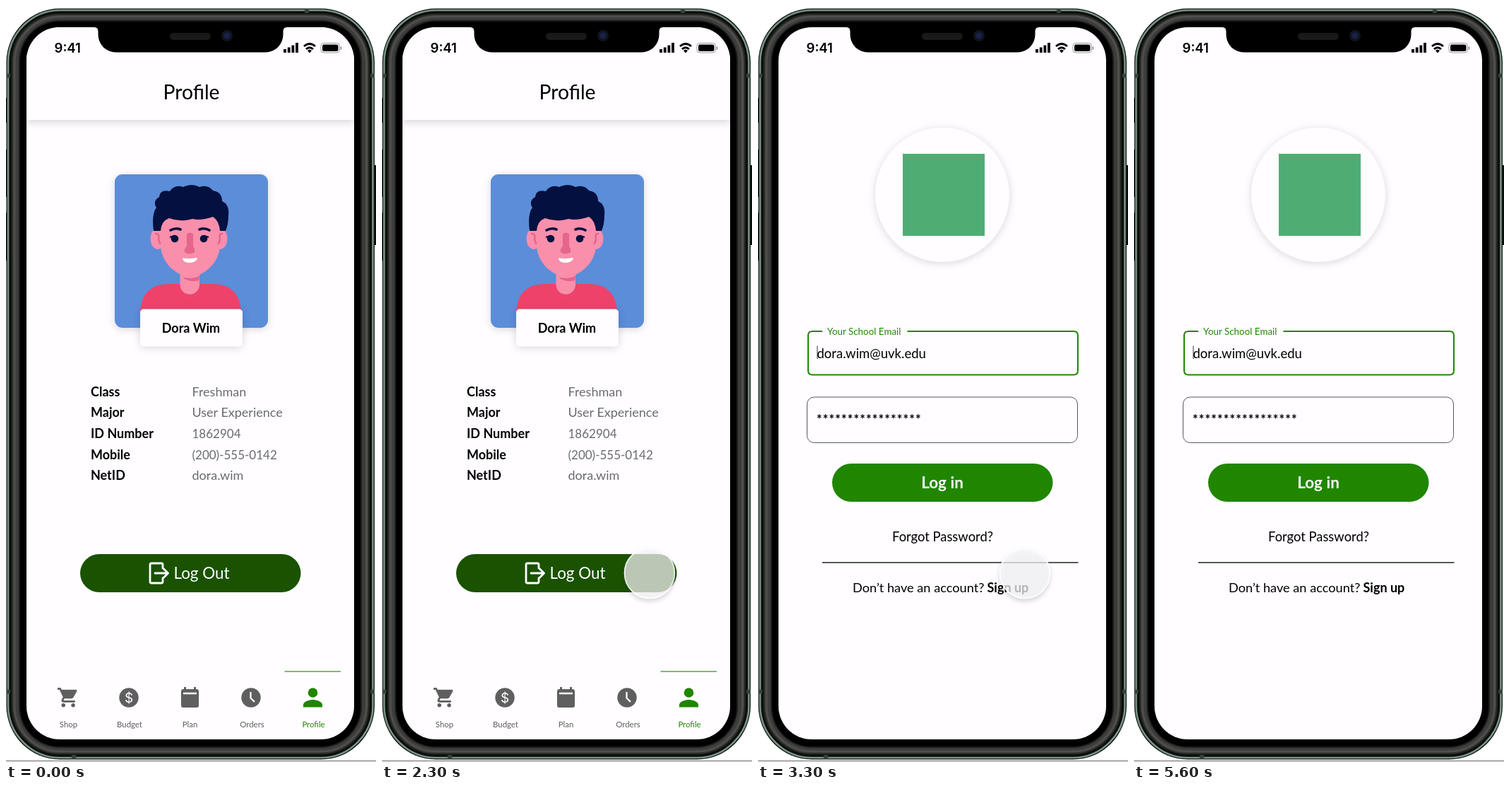
An HTML page that plays this animation: 524 by 1069 pixels, repeating every 5700 ms.

```html
<!DOCTYPE html>
<html lang="en">
<head>
<meta charset="utf-8">
<title>Log out flow</title>
<style>
  html, body { margin: 0; width: 100%; height: 100%; overflow: hidden; background: #fff; }
  svg { display: block; width: 524px; height: 1069px; font-family: Lato, "Open Sans", sans-serif; }
  .mid { text-anchor: middle; }
  .bold { font-weight: 700; }
  .body { font-size: 18px; }
  .value { font-size: 18px; fill: #6b6b6d; }
  .num { font-size: 17px; }
  .tabs { font-size: 11.4px; fill: #5f5f5f; }
  .soft { filter: drop-shadow(0 2px 6px rgba(0, 0, 0, .15)); }
  .line { fill: none; stroke-linecap: round; stroke-linejoin: round; }

  #profile, #login, #badge, #cursor, #idle, #press { animation: 5700ms linear infinite; }
  #profile { animation-name: profile; animation-timing-function: step-end; }
  #login { animation-name: login; }
  #badge { animation-name: badge; }
  #cursor { animation-name: cursor; }
  #idle { animation-name: idle; }
  #press { animation-name: press; }

  @keyframes profile {
    0% { visibility: visible; }
    49.12%, 100% { visibility: hidden; }
  }
  @keyframes badge {
    0% { transform: translateY(266px); visibility: hidden; }
    49.11% { visibility: hidden; }
    49.12% { visibility: visible; }
    52.63% { transform: translateY(266px); animation-timing-function: ease-out; }
    57.02%, 100% { transform: none; visibility: visible; }
  }
  @keyframes login {
    0%, 52.63% { opacity: 0; animation-timing-function: ease-out; }
    57.02%, 100% { opacity: 1; }
  }
  @keyframes cursor {
    0%, 15.8% { transform: translate(425px, 795px); animation-timing-function: ease-out; }
    26.3%, 31.6% { transform: translate(393px, 800px); animation-timing-function: ease-in-out; }
    42.1%, 64.9% { transform: translate(378px, 802px); animation-timing-function: ease-in-out; }
    71.9%, 100% { transform: translate(420px, 804px); }
  }
  @keyframes idle {
    0%, 15.8% { opacity: 0; }
    19.3%, 43.8% { opacity: 1; }
    46.5%, 48.3% { opacity: 0; }
    49.12%, 67.5% { opacity: 1; }
    71.9%, 100% { opacity: 0; }
  }
  @keyframes press {
    0%, 43.8% { opacity: 0; }
    46.5%, 48.3% { opacity: 1; }
    49.12%, 100% { opacity: 0; }
  }
</style>
</head>
<body>
<svg viewBox="0 0 524 1069">
  <defs>
    <clipPath id="screen"><rect x="29" y="30" width="464" height="1007" rx="47"/></clipPath>
    <clipPath id="photo"><rect x="154" y="238" width="217" height="217" rx="11"/></clipPath>
  </defs>

  <!-- phone body -->
  <path d="M0 1067.5H524" stroke="#666"/>
  <path d="M0 130V165M0 203V270M0 292V360" stroke="#111" stroke-width="2"/>
  <rect x="519" y="225" width="6" height="113" rx="2" fill="#0b0f0d"/>
  <rect x="0.5" y="3.5" width="521.5" height="1062" rx="76" fill="#0d1411"/>
  <rect x="3" y="6" width="516.5" height="1057" rx="74" fill="#0b0e0c" stroke="#7c9287" stroke-width="2.6"/>
  <path d="M426 4V10M96 1059V1065M1 98.5H6M516 98.5H522M1 969.5H6M516 969.5H522" stroke="#36423c" stroke-width="6"/>
  <rect x="8.5" y="11.5" width="505.5" height="1046" rx="68" fill="#3c3d3b" stroke="#242523" stroke-width="2"/>
  <rect x="12" y="15" width="498.5" height="1039" rx="65" fill="#3c3d3b" stroke="#4e4f4d" stroke-width="3"/>
  <rect x="18" y="20" width="486" height="1029" rx="58" fill="#1c1c1c"/>
  <rect x="20" y="22" width="482" height="1025" rx="56" fill="#000"/>
  <rect x="29" y="30" width="464" height="1007" rx="47" fill="#fffdff"/>

  <g clip-path="url(#screen)">
    <g id="profile">
      <rect x="29" y="20" width="464" height="141" fill="#fffdff" style="filter:drop-shadow(0 3px 6px rgba(0,0,0,.16))"/>
      <text class="mid" x="262.5" y="132" font-size="28.3">Profile</text>

      <rect class="soft" x="154" y="238" width="217" height="217" rx="11" fill="#5b8dd9"/>
      <g clip-path="url(#photo)">
        <path d="M190 432C192 405 206 393 232 393H291C317 393 331 405 333 432V460H190Z" fill="#ef426b"/>
        <path d="M246.5 370H274V394A13.7 13.7 0 0 1 246.5 394Z" fill="#f98fab"/>
        <path d="M250 383Q262 387 273.5 382V388Q262 391 253 386Z" fill="#e4668c"/>
        <g fill="#f98fab">
          <ellipse cx="215" cy="329" rx="10.5" ry="15"/>
          <ellipse cx="303" cy="329" rx="10.5" ry="15"/>
          <path d="M219 292H303V338C303 364 278 383 261 383S219 364 219 338Z"/>
        </g>
        <path class="line" d="M212 322Q218 322 216 330L218 336M306 322Q301 322 303 330L301 336" stroke="#e4668c" stroke-width="2.5"/>
        <path d="M209 318Q206 294 213 285Q207 276 217 270Q218 259 232 262Q239 252 251 256Q263 250 274 256Q286 252 293 261Q306 263 306 276Q317 281 315 296Q315 308 311 318H303Q302 304 293 298Q276 304 264 301Q246 306 231 300Q220 304 219 318Z" fill="#04103f"/>
        <path class="line" d="M233 317Q240 313 247 316M274 316Q281 313 288 317" stroke="#04103f" stroke-width="3.6"/>
        <circle cx="239" cy="329" r="5.3" fill="#04103f"/>
        <circle cx="280" cy="329" r="5.3" fill="#04103f"/>
        <path d="M232 327L238 325M287 327L281 325" stroke="#04103f" stroke-width="2"/>
        <path d="M256 322Q260 319 265 322V340Q268 343 267 348Q260 353 253 348Q252 343 256 340Z" fill="#e4668c"/>
        <path d="M250 356.5Q260 358 271 356Q270 363 260 363Q251 363 250 356.5Z" fill="#fff"/>
      </g>
      <rect class="soft" x="190" y="428.5" width="145" height="53" rx="5" fill="#fffdff"/>
      <text class="mid bold body" x="262" y="462">Dora Wim</text>

      <g class="bold body">
        <text x="120" y="552">Class</text>
        <text x="120" y="581">Major</text>
        <text x="120" y="611">ID Number</text>
        <text x="120" y="640.5">Mobile</text>
        <text x="120" y="669.5">NetID</text>
      </g>
      <g class="value">
        <text x="263.5" y="552">Freshman</text>
        <text x="263.5" y="581">User Experience</text>
        <text class="num" x="263.5" y="611">1862904</text>
        <text class="num" x="263.5" y="640.5">(200)-555-0142</text>
        <text x="263.5" y="669.5">dora.wim</text>
      </g>

      <rect x="105" y="775" width="312.5" height="54" rx="27" fill="#1a5200"/>
      <path class="line" d="M222 795V790Q222 788 220 788H206Q204 788 204 790V814Q204 816 206 816H220Q222 816 222 814V809M211 802H229M223.5 796L229.5 802L223.5 808" stroke="#fff" stroke-width="2.8"/>
      <text x="237.5" y="810" font-size="22.4" fill="#fff">Log Out</text>

      <path d="M394.5 941H474" stroke="#5aa04e" stroke-width="1.6"/>
      <g fill="#5f5f5f">
        <path transform="translate(71.6 961.2) scale(1.38)" d="M7 18a2 2 0 1 0 0 4a2 2 0 1 0 0-4ZM1 2V4H3L6.6 11.6L5.25 14Q5 14.5 5 15Q5 17 7 17H19V15H7.4L7.2 14.6L8.1 13H15.5Q16.7 13 17.3 12L20.9 5.5Q21.2 4 20 4H5.2L4.3 2ZM17 18a2 2 0 1 0 0 4a2 2 0 1 0 0-4Z"/>
        <circle cx="174" cy="978" r="13.7"/>
        <path d="M251 966H252V963H255V966H266V963H269V966H270Q273 966 273 969V989Q273 992 270 992H251Q248 992 248 989V969Q248 966 251 966Z"/>
        <circle cx="347" cy="978" r="13.7"/>
      </g>
      <path d="M251 972H270" stroke="#fff" stroke-width="2.4"/>
      <path d="M346.5 970V978.5L352 984" fill="none" stroke="#fff" stroke-width="2.3"/>
      <text class="mid" x="174" y="985" font-size="19" fill="#fff" style="font-family:Inter,sans-serif">$</text>
      <g fill="#208600">
        <circle cx="434.5" cy="971" r="6.8"/>
        <path d="M421 991.5V988C421 983.5 430 981 434.5 981S448 983.5 448 988V991.5Z"/>
      </g>
      <g class="tabs mid">
        <text x="88.5" y="1019.5">Shop</text>
        <text x="175" y="1019.5">Budget</text>
        <text x="260.5" y="1019.5">Plan</text>
        <text x="348.5" y="1019.5">Orders</text>
        <text x="435.5" y="1019.5" fill="#208600">Profile</text>
      </g>
    </g>

    <g id="badge">
      <circle class="soft" cx="261" cy="267" r="95" fill="#fffdff"/>
      <rect x="205" y="209" width="116" height="116" fill="#4fad74"/>
    </g>

    <g id="login">
      <path d="M91 460H77Q71 460 71 466V515.5Q71 521.5 77 521.5H447Q453 521.5 453 515.5V466Q453 460 447 460H211.5" fill="none" stroke="#208600" stroke-width="2"/>
      <text x="98" y="465" font-size="13.4" fill="#208600">Your School Email</text>
      <path d="M84 480.5V499" stroke="#333"/>
      <text x="83.5" y="498" font-size="18.5">dora.wim@uvk.edu</text>
      <rect x="69.5" y="553" width="383" height="64.5" rx="10" fill="none" stroke="#55555c"/>
      <text class="bold" x="83" y="591" font-size="18" letter-spacing="1.1">*****************</text>
      <rect x="105" y="647" width="312.5" height="54" rx="27" fill="#208600"/>
      <text class="mid bold" x="261" y="682" font-size="22.5" fill="#fff">Log in</text>
      <text class="mid" x="261.5" y="757" font-size="18.4">Forgot Password?</text>
      <path d="M91 787H453.5" stroke="#222" stroke-width="1.3"/>
      <text x="134" y="829" font-size="18.2">Don’t have an account?</text>
      <text class="bold" x="324.5" y="829" font-size="18">Sign up</text>
    </g>

    <g id="cursor">
      <g id="idle">
        <circle r="35.5" fill="#faf9fb" fill-opacity=".72" stroke="#fff" stroke-width="1.5" style="filter:drop-shadow(0 4px 3px rgba(0,0,0,.18))"/>
      </g>
      <circle id="press" r="35.5" fill="#fff" fill-opacity=".44" stroke="#fff" stroke-opacity=".9" stroke-width="1.5"/>
    </g>
  </g>

  <!-- notch and status bar -->
  <path d="M125 29V30Q130.5 30 130.5 36V40.5A25 25 0 0 0 155.500 65.500H367.500A25 25 0 0 0 392.500 40.500V36Q392.500 30 398 30V29Z"/>
  <rect x="232" y="38" width="58" height="10" rx="5" fill="#191919"/>
  <circle cx="313" cy="42" r="8" fill="#11131d"/>
  <circle cx="313" cy="42" r="4.5" fill="#17224c"/>
  <text x="68.5" y="65.5" font-size="18.6" font-weight="600" style="font-family:Inter,sans-serif">9:41</text>
  <path d="M395 66V61M400.7 66V58.5M406.4 66V55.5M412 66V52" stroke="#000" stroke-width="3.8"/>
  <path d="M422 57Q430 50 438 57M425 61Q430 56.5 435 61" fill="none" stroke="#000" stroke-width="2.8"/>
  <path d="M427 63Q430 60.5 433 63L430 66.5Z"/>
  <rect x="446" y="52.5" width="26.5" height="13.5" rx="4" fill="none" stroke="#999"/>
  <rect x="448" y="54.5" width="22.5" height="9.5" rx="2.5"/>
  <path d="M474.5 57.5V61.5" stroke="#888" stroke-width="1.5"/>
</svg>
</body>
</html>
```
